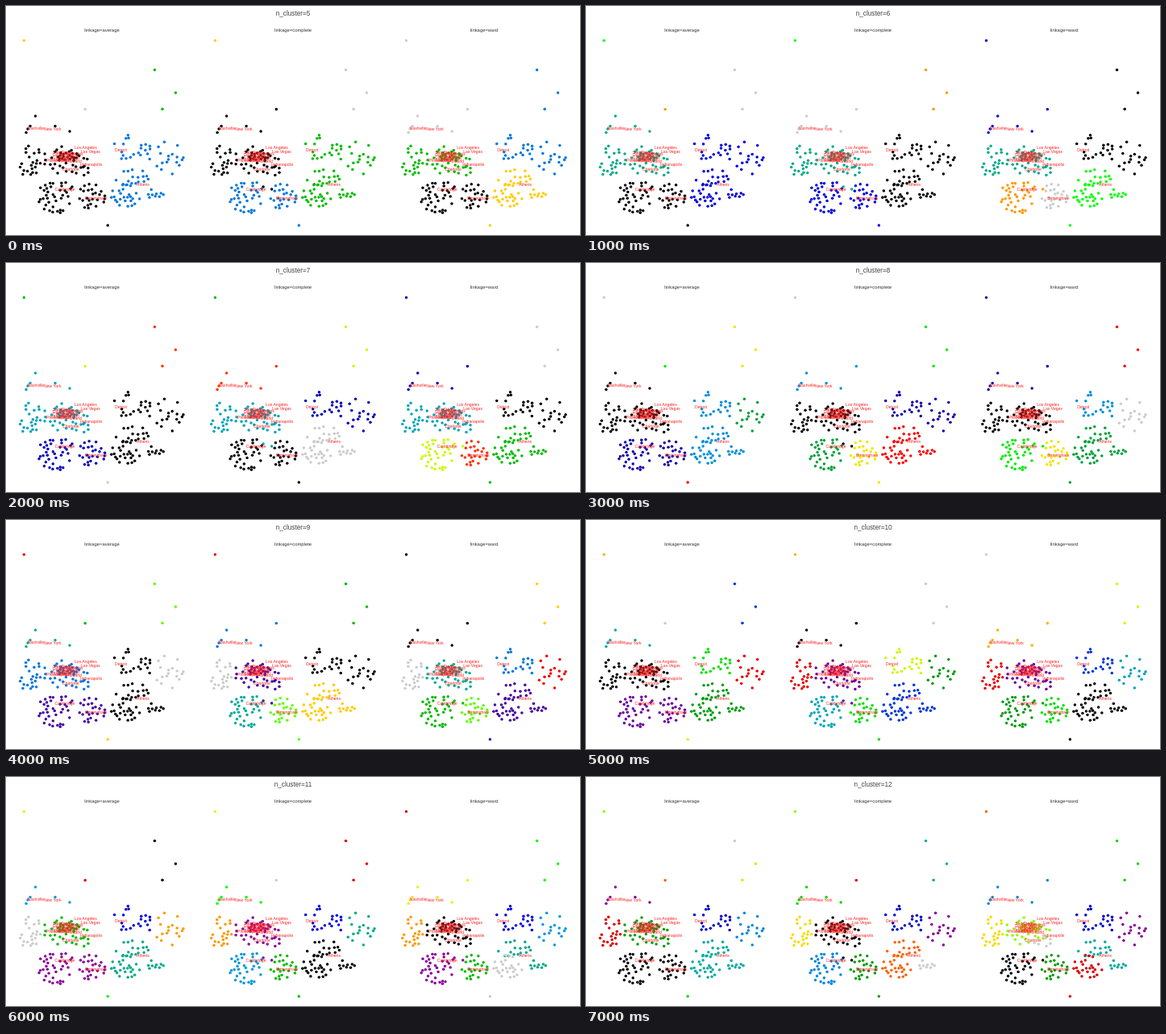
Animation of 712 by 285 pixels, one loop 8000 ms. Source, as an HTML page:

```html
<!DOCTYPE html>
<html lang="en">
<head>
<meta charset="utf-8">
<title>Linkage comparison</title>
<style>
  html, body { margin: 0; width: 100%; height: 100%; overflow: hidden; background: #fff; }
  svg { display: block; width: 712px; height: 285px; }
  text { font-family: "Liberation Sans", Arial, sans-serif; fill: #444; }
  .title { font-size: 8.2px; text-anchor: middle; }
  .sub { font-size: 5.9px; text-anchor: middle; fill: #333; }
  .city { font-size: 5.1px; fill: #f22; }
</style>
</head>
<body>
<svg id="stage" viewBox="0 0 712 285"></svg>
<script>
const STEP = 1000, FIRST = 5, PANEL = 237.1, DOT = 1.75, GAP = 2.8;

let seed = 2024;
const rand = () => (seed = seed * 16807 % 2147483647) / 2147483647;

// Random points inside an ellipse, none closer than GAP to another.
function cloud(x, y, rx, ry, count) {
  const pts = [];
  while (pts.length < count) {
    const a = rand() * 2 * Math.PI, r = Math.sqrt(rand());
    const p = [x + rx * r * Math.cos(a), y + ry * r * Math.sin(a)];
    if (pts.every(q => Math.hypot(q[0] - p[0], q[1] - p[1]) > GAP)) pts.push(p);
  }
  return pts;
}

// Sets of points that always share a cluster: outliers first, then clouds.
const sets = {
  A: [[22.3, 43]],
  B: [[184.4, 79.5]],
  N: [[210.4, 108], [194, 128.3]],
  F: [[98.2, 128.5]],
  Z: [[126.2, 273]],
  K: [[36.5, 137], [30, 149.5], [25, 157.5], [27, 153], [61, 149.5], [79, 156]],
  X: [[82, 225], [92.5, 228]],
  W: cloud(31, 195, 14, 23, 22),
  C: [...cloud(73, 192, 28, 18, 26), ...cloud(77, 187, 16, 6, 20)],
  D: cloud(92, 204, 11, 8, 6),
  S: cloud(62, 237, 24, 21, 37),
  M: cloud(105, 237, 18, 17, 24),
  U: cloud(158, 180, 26, 21, 21),
  R: cloud(202, 189, 18, 23, 17),
  P: cloud(158, 214, 23, 11, 17),
  Q: cloud(148, 236, 19, 15, 25),
  T: cloud(184, 233, 14, 8, 9)
};

const cities = [
  ["Nashville", 26.5, 154], ["New York", 47, 154.8], ["Los Angeles", 85, 178],
  ["Las Vegas", 93, 183.2], ["Philadelphia", 50, 194.4], ["Charlotte", 70, 204.6],
  ["Indianapolis", 92, 199], ["Cambridge", 60.5, 230.2], ["Birmingham", 98, 240.6],
  ["Detroit", 135, 181.2], ["Athens", 162, 224]
];

// Overprinted labels in the crowded middle, in three staggered columns.
"San Diego,Houston,Memphis,Dallas,Phoenix,Denver,Chicago,Seattle,Boston,Atlanta,Austin,Portland"
  .split(",")
  .forEach((city, i) => cities.push([city, 58 + 8.5 * (i % 3), 184 + i]));

// Each row is one cluster count; word order gives the cluster label.
const panels = {
  average: [
    "KWCDXSMZ URPQT BN A F",
    "XSMZ URPQT KWCD A F BN",
    "URPQT XSM KWCD A F BN Z",
    "KWCD XSM UPQT R F BN Z A",
    "UPQT XSM WCD K F BN Z A R",
    "WCD XSM BN K PQT U Z A R F",
    "BN XSM U K PQT CD Z A R F W",
    "XSM K U R PQT CD Z A N F W B"
  ],
  complete: [
    "KFWCDX SMZ URPQT A BN",
    "URPQT SMZ WCDX A BN KF",
    "SMZ UR WCDX A BN KF PQT",
    "WCDX UR KF S BN MZ PQT A",
    "UR CDX KF S BN MZ PQT A W",
    "KF CDX PQT S R MZ U A W BN",
    "PQT CDX U S R MZ K A W BN F",
    "CDX R U S BN MZ K A W PQ F T"
  ],
  ward: [
    "XSM BNUR WCD PQTZ AKF",
    "BNUR AKF WCD PQTZ XS M",
    "UR AKF WCD PQTZ XS M BN",
    "WCD AKF U PQTZ XS M BN R",
    "AKF PQTZ U CD XS M BN R W",
    "PQTZ CD U R XS M BN KF W A",
    "CD XS U R PT M BN KF W A QZ",
    "XS R U KF PT M BN C W A QZ D"
  ]
};
const steps = panels.ward.length;

// Spectral colour map, evenly spaced stops.
const stops = ("000 708 809 00a 00d 07d 09d 0aa 0a8 090 0b0 " +
               "0d0 0f0 bf0 ee0 fc0 f90 f00 d00 c00 ccc").split(" ");
function spectral(t) {
  const p = t * (stops.length - 1), i = Math.min(Math.floor(p), stops.length - 2);
  const mix = [0, 1, 2].map(k => {
    const a = parseInt(stops[i][k], 16), b = parseInt(stops[i + 1][k], 16);
    return Math.round(17 * (a + (b - a) * (p - i)));
  });
  return `rgb(${mix})`;
}

const stage = document.getElementById("stage");
function add(parent, tag, attrs, text) {
  const el = document.createElementNS("http://www.w3.org/2000/svg", tag);
  for (const k in attrs) el.setAttribute(k, attrs[k]);
  if (text) el.textContent = text;
  return parent.appendChild(el);
}

const title = add(stage, "text", { class: "title", x: 356, y: 12 });
const layers = Object.entries(panels).map(([name, rows], i) => {
  const panel = add(stage, "g", { transform: `translate(${i * PANEL} 0)` });
  add(panel, "text", { class: "sub", x: 119, y: 32 }, "linkage=" + name);
  const groups = {};
  for (const key in sets) {
    groups[key] = add(panel, "g", {});
    for (const [cx, cy] of sets[key]) add(groups[key], "circle", { cx, cy, r: DOT });
  }
  for (const [city, x, y] of cities) add(panel, "text", { class: "city", x, y }, city);
  return { rows, groups };
});

function show(step) {
  const n = FIRST + step;
  title.textContent = "n_cluster=" + n;
  for (const { rows, groups } of layers)
    rows[step].split(" ").forEach((keys, label) => {
      const fill = spectral(label / (n - 1));
      for (const key of keys) groups[key].setAttribute("fill", fill);
    });
}

let shown = 0;
show(0);
const start = performance.now();
function tick() {
  const step = Math.floor((performance.now() - start) / STEP) % steps;
  if (step !== shown) show(shown = step);
  requestAnimationFrame(tick);
}
requestAnimationFrame(tick);
</script>
</body>
</html>
```
